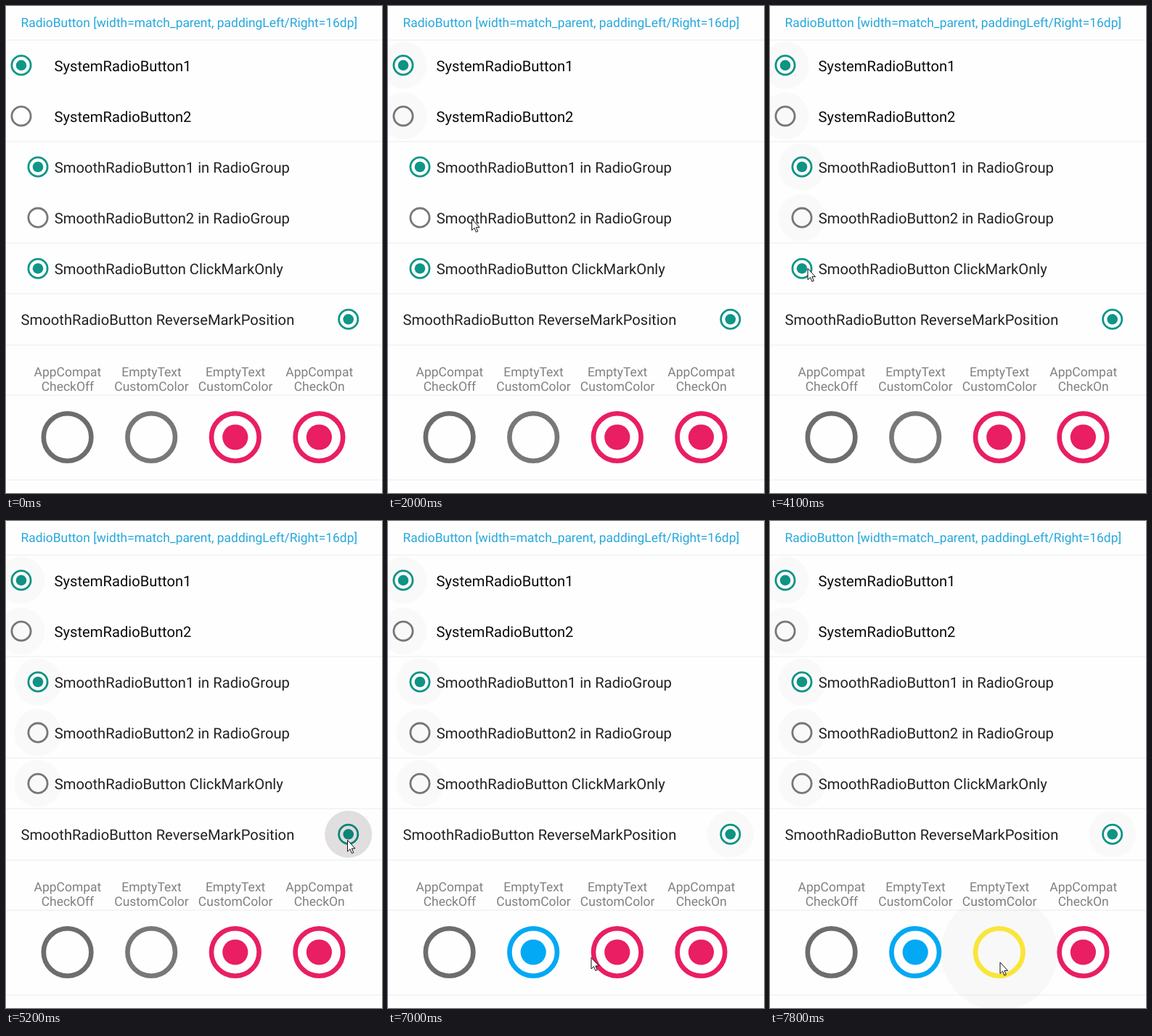
Recreate the animation shown at these times as an HTML page. Size 518 px wide and 672 px high, loop 8000 ms.

```html
<!DOCTYPE html>
<html lang="en">
<head>
<meta charset="utf-8">
<title>Radio buttons</title>
<style>
  html, body { margin: 0; width: 100%; height: 100%; overflow: hidden; background: #fefefe; }
  svg { display: block; width: 100%; height: 100%; }
  text { font-family: Roboto, "Noto Sans", sans-serif; text-rendering: geometricPrecision; }
  .row { font-size: 20.2px; fill: #222; }
  .system { fill: #0a0a0a; }
  .title { font-size: 17.4px; fill: #25a8dc; }
  .label { font-size: 17.5px; fill: #808080; text-anchor: middle; }
</style>
</head>
<body>
<svg id="stage" viewBox="0 0 518 672"></svg>
<script>
const LOOP = 8000, STEP = 100, FADE = 300, TRAVEL = 300;
const TEAL = [14, 150, 136], GRAY = [120, 120, 120], DARK = [109, 109, 109];
const PINK = [233, 30, 99], BLUE = [3, 169, 244], YELLOW = [255, 235, 59];
const stage = document.getElementById('stage');

function add(tag, attrs, text) {
  const el = document.createElementNS('http://www.w3.org/2000/svg', tag);
  set(el, attrs);
  if (text) el.textContent = text;
  return stage.appendChild(el);
}

function set(el, attrs) {
  for (const key in attrs) el.setAttribute(key, attrs[key]);
}

const clamp = p => Math.max(0, Math.min(1, p));
const smooth = p => p * p * (3 - 2 * p);
const lerp = (a, b, p) => a + (b - a) * p;
const blend = (a, b, p) => `rgb(${a.map((v, i) => Math.round(lerp(v, b[i], p)))})`;

const rowY = i => 81.8 + 70.1 * i;
const columnX = i => 84.6 + 115.6 * i;

add('text', { x: 20.6, y: 29.3, class: 'title' },
  'RadioButton [width=match_parent, paddingLeft/Right=16dp]');
for (const y of [47, 187, 327, 397, 468, 537, 654])
  add('rect', { y: y - 0.5, width: 518, height: 1, fill: '#e9eff0' });

// presses: [down, up] times; a press in a group clears the other members
const system = { x: 21, textX: 66.5, style: 'row system', group: 'system' };
const grouped = { group: 'smooth', tint: 0.07 };
const rows = [
  { text: 'SystemRadioButton1', ...system, on: 1, presses: [[1400, 1500]] },
  { text: 'SystemRadioButton2', ...system, presses: [[600, 1000]] },
  { text: 'SmoothRadioButton1 in RadioGroup', ...grouped, on: 1, presses: [[2900, 3300]] },
  { text: 'SmoothRadioButton2 in RadioGroup', ...grouped, presses: [[2300, 2400]] },
  { text: 'SmoothRadioButton ClickMarkOnly', on: 1, presses: [[4400, 4500]] },
  { text: 'SmoothRadioButton ReverseMarkPosition', x: 471.7, textX: 20.6, on: 1,
    presses: [[5200, 5300], [5900, 6000]] }
].map((row, i) => ({
  x: 44, y: rowY(i), textX: 66.8, style: 'row', ring: 13.1, line: 2.8, dot: 7.3,
  halo: 32.5, tint: 0.125, rest: 0.02, color: TEAL, off: GRAY, ...row
}));

const columns = [
  { text: ['AppCompat', 'CheckOff'], off: DARK },
  { text: ['EmptyText', 'CustomColor'], color: BLUE, rest: 0, presses: [[6600, 6700]] },
  { text: ['EmptyText', 'CustomColor'], on: 1, off: YELLOW, presses: [[7300, 7400]] },
  { text: ['AppCompat', 'CheckOn'], on: 1 }
].map((column, i) => ({
  x: columnX(i), y: 595, ring: 32.8, line: 6.6, dot: 17.6,
  halo: 80.5, tint: 0.07, rest: 0.025, color: PINK, off: GRAY, ...column
}));

for (const r of rows) add('text', { x: r.textX, y: r.y + 8, class: r.style }, r.text);
for (const c of columns) c.text.forEach((word, line) =>
  add('text', { x: c.x + 0.3, y: 511.3 + line * 20, class: 'label' }, word));

const buttons = [...rows, ...columns];
for (const b of buttons) {
  const at = { cx: b.x, cy: b.y };
  b.presses = b.presses || [];
  b.flips = buttons.filter(o => o === b || (b.group && o.group === b.group))
    .flatMap(o => (o.presses || []).map(press => press[1])).sort((a, c) => a - c);
  b.ringEl = add('circle', { ...at, r: b.ring, fill: 'none', 'stroke-width': b.line });
  b.dotEl = add('circle', at);
  b.haloEl = add('circle', { ...at, r: b.halo, fill: '#10000c' });
}

// pointer stops: [arrival time, x, y]
const stops = [
  [100, 406, 78], [400, 124, 145], [1200, 126, 89], [2000, 115, 294],
  [2800, 122, 218], [3500, 103, 360], [4200, 33.5, 363], [4800, 476, 445],
  [5000, 470, 440.5], [5700, 365, 444], [6300, 148.5, 576], [6400, 191.5, 599.5],
  [7000, 279.5, 602.5], [7100, 316.5, 609]
];
const pointer = add('path', {
  d: 'M.5 0V15.5L4 12.2L6.4 18L8.8 17L6.4 11.4H11Z',
  fill: '#fff', stroke: '#111', 'stroke-width': 1, 'stroke-linejoin': 'round'
});

function pointerAt(t) {
  const i = stops.findIndex(stop => stop[0] > t);
  if (i < 0) return stops[stops.length - 1].slice(1);
  if (i === 0) return null;
  const [from, x0, y0] = stops[i - 1], [to, x1, y1] = stops[i];
  const start = Math.max(from, to - TRAVEL);
  const p = smooth(clamp((t - start) / (to - start)));
  return [lerp(x0, x1, p), lerp(y0, y1, p)];
}

// 0 = off, 1 = on; every flip swings the mark to its other state
function checkedAt(b, t) {
  return b.flips.reduce((value, flip) => {
    const p = t < flip ? 0 : clamp((t - flip + STEP) / FADE);
    return lerp(value, value < 0.5 ? 1 : 0, p);
  }, b.on || 0);
}

// full tint while held, then fading to a faint trace
function haloAt(b, t) {
  const press = b.presses.filter(([down]) => down <= t).pop();
  return press ? lerp(b.tint, b.rest, clamp((t - press[1]) / FADE)) : 0;
}

function draw(time) {
  const t = Math.floor((time % LOOP) / STEP) * STEP;
  for (const b of buttons) {
    const p = checkedAt(b, t), color = blend(b.off, b.color, p);
    set(b.ringEl, { stroke: color });
    set(b.dotEl, { fill: color, r: b.dot * p });
    set(b.haloEl, { opacity: haloAt(b, t) });
  }
  const at = pointerAt(t);
  set(pointer, at ? { visibility: 'visible', transform: `translate(${at})` } : { visibility: 'hidden' });
}

let origin = null;
function tick(now) {
  if (origin === null) origin = now;
  draw(now - origin);
  requestAnimationFrame(tick);
}
draw(0);
requestAnimationFrame(tick);
</script>
</body>
</html>
```
